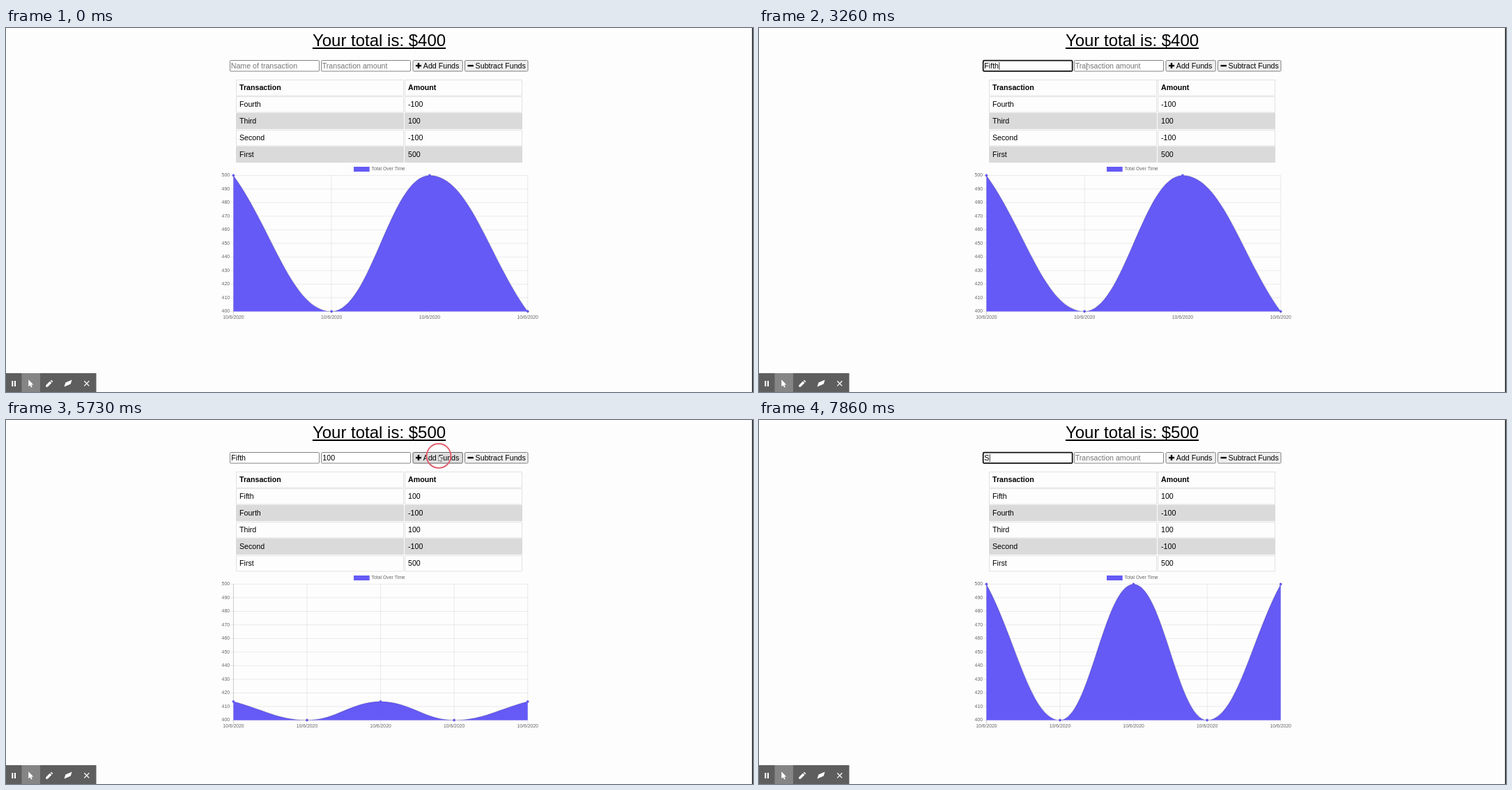
Recreate the animation shown at these times as an HTML page with a canvas. Size 1072 by 522 pixels, loop 8 s.

```html
<!DOCTYPE html>
<html lang="en">
<head>
<meta charset="utf-8">
<title>Budget tracker</title>
<style>
  html, body { margin: 0; width: 100%; height: 100%; overflow: hidden; background: #fdfdfd; }
  canvas { position: absolute; left: 0; top: 0; }
  h1 {
    position: absolute; left: 0; top: 4px; width: 1071px; margin: 0; text-align: center;
    font: 24px/27px "Liberation Sans", Arial, sans-serif; text-decoration: underline; color: #000;
  }
</style>
</head>
<body>
<canvas id="stage" width="1072" height="522"></canvas>
<h1 id="total"></h1>
<script>
const ctx = document.getElementById('stage').getContext('2d');
const total = document.getElementById('total');
const LOOP = 8000, PURPLE = '#655af6';
const ADDED = 5695, CLEARED = 6060;
const FONT = '"Liberation Sans", Arial, sans-serif';

// Form states: time, name value, amount value, focused field
const FORM = [
  [0, '', '', ''], [110, '', '', 'name'],
  [1390, 'F', '', 'name'], [1590, 'Fi', '', 'name'], [1720, 'Fif', '', 'name'],
  [1920, 'Fift', '', 'name'], [2080, 'Fifth', '', 'name'],
  [3580, 'Fifth', '', 'amount'], [4390, 'Fifth', '1', 'amount'],
  [4650, 'Fifth', '10', 'amount'], [4820, 'Fifth', '100', 'amount'],
  [5590, 'Fifth', '100', ''], [CLEARED, '', '', ''],
  [6690, '', '', 'name'], [7830, 'S', '', 'name']
];
// Pointer path: time, x, y
const PATH = [
  [0, 390, 54], [3060, 390, 54], [3360, 510, 56], [5230, 510, 56],
  [5450, 620.7, 51], [6080, 620.7, 51], [6330, 460.5, 63.5], [6500, 390, 55], [LOOP, 390, 55]
];
const POINTER_SHOWN = [[60, 1390], [3060, 4390], [5230, 7830]];
const CLICKS = [[110, 390], [3590, 3860], [5590, 5800], [6690, 6960]];
const ROWS = [['Fifth', '100'], ['Fourth', '-100'], ['Third', '100'], ['Second', '-100'], ['First', '500']];

const within = (t, spans) => spans.some(([from, to]) => t >= from && t < to);

function text(str, x, y, { size = 10.67, color = '#000', bold = false, align = 'left', base = 'alphabetic' } = {}) {
  ctx.font = `${bold ? 'bold ' : ''}${size}px ${FONT}`;
  ctx.fillStyle = color;
  ctx.textAlign = align;
  ctx.textBaseline = base;
  ctx.fillText(str, x, y);
}

function box(x, y, w, h, fill, stroke, radius = 0, lineWidth = 1) {
  ctx.beginPath();
  ctx.roundRect(x, y, w, h, radius);
  if (fill) { ctx.fillStyle = fill; ctx.fill(); }
  if (stroke) { ctx.strokeStyle = stroke; ctx.lineWidth = lineWidth; ctx.stroke(); }
}

function line(x1, y1, x2, y2, color, width) {
  ctx.beginPath();
  ctx.moveTo(x1, y1);
  ctx.lineTo(x2, y2);
  ctx.strokeStyle = color;
  ctx.lineWidth = width;
  ctx.stroke();
}

function polygon(points, fill, stroke) {
  ctx.beginPath();
  points.forEach(([x, y]) => ctx.lineTo(x, y));
  ctx.closePath();
  if (fill) { ctx.fillStyle = fill; ctx.fill(); }
  if (stroke) { ctx.strokeStyle = stroke; ctx.lineWidth = 0.8; ctx.stroke(); }
}

const arrow = (x, y, k) =>
  [[0, 0], [0, 9], [2.1, 7.2], [3.6, 10.2], [5, 9.5], [3.6, 6.7], [6.3, 6.5]].map(([px, py]) => [x + px * k, y + py * k]);

function field(x, value, placeholder, focused, caretOn) {
  if (focused) box(x + 0.7, 46.7, 128, 15.2, '#fff', '#101010', 1.5, 1.8);
  else box(x + 0.5, 46.5, 128, 15.5, '#fff', '#858585', 1);
  if (value) text(value, x + 2.3, 58);
  else text(placeholder, x + 1.7, 58, { color: '#757575' });
  if (focused && caretOn) {
    ctx.font = `10.67px ${FONT}`;
    ctx.fillStyle = '#222';
    ctx.fillRect(x + 2.7 + ctx.measureText(value).width, 49, 0.9, 11);
  }
}

function spinner() {
  box(571, 48, 7, 12.5, '#efefef');
  polygon([[572.4, 52.6], [576, 52.6], [574.2, 50.2]], '#555');
  polygon([[572.4, 56], [576, 56], [574.2, 58.4]], '#555');
}

function drawForm(t) {
  const [since, name, amount, focus] = FORM.filter(s => s[0] <= t).pop();
  const caretOn = (t - since) % 1000 < 500;
  field(321, name, 'Name of transaction', focus === 'name', caretOn);
  field(452, amount, 'Transaction amount', focus === 'amount', caretOn);
  if (focus === 'amount') spinner();

  const pressed = t >= 5590 && t < 5700, hover = t >= 5430 && t < 6120;
  box(584, 46.5, 71.3, 15.5, pressed ? '#f5f5f5' : hover ? '#dedede' : '#efefef',
    pressed ? '#8d8d8d' : hover ? '#606060' : '#808080', 1.5);
  ctx.fillStyle = '#000';
  ctx.fillRect(588, 52.9, 8, 2.4);
  ctx.fillRect(590.8, 50, 2.4, 8);
  text('Add Funds', 598.8, 58);
  box(658.5, 46.5, 90.5, 15.5, '#efefef', '#808080', 1.5);
  ctx.fillStyle = '#000';
  ctx.fillRect(662.5, 52.9, 8.4, 2.4);
  text('Subtract Funds', 673.6, 58);
}

function drawTable(rows) {
  [['Transaction', 'Amount'], ...rows].forEach((cells, i) => {
    const y = 74 + i * 24, shaded = i > 0 && i % 2 === 0;
    [[330, 241], [572, 169]].forEach(([x, w], column) => {
      if (shaded) box(x, y - 0.2, w, 23.2, '#dadada');
      else box(x + 0.5, y + 0.5, w - 1, 22.5, null, '#e2e2e2');
      text(cells[column], x + 5, y + 15, { bold: i === 0 });
    });
  });
}

function drawChart(count, grow, dy) {
  const left = 326.4, right = 748.7, top = 211.4 + dy, bottom = 406.4 + dy;
  const step = (right - left) / (count - 1), label = { size: 6.85, color: '#666', base: 'middle' };
  box(499, 199 + dy, 22.7, 7, PURPLE);
  text('Total Over Time', 524.6, 202.4 + dy, label);

  for (let i = 0; i <= 10; i++) {
    const y = top + i * (bottom - top) / 10;
    line(left - 5, y, right, y, 'rgba(0,0,0,.1)', 0.8);
    text(500 - i * 10, left - 5.4, y, { ...label, align: 'right' });
  }
  const points = [];
  for (let i = 0; i < count; i++) {
    const x = left + i * step;
    line(x, top, x, bottom + 5, i ? 'rgba(0,0,0,.1)' : 'rgba(0,0,0,.25)', 0.8);
    text('10/6/2020', x, 415.5 + dy, { ...label, align: 'center' });
    points.push([x, i % 2 ? bottom : bottom - (bottom - top) * grow]);
  }

  // Tangents are flat at inner points and follow the chord at both ends.
  const tension = 0.4, pull = step * tension;
  const curve = new Path2D();
  curve.moveTo(...points[0]);
  for (let i = 1; i < count; i++) {
    const [x0, y0] = points[i - 1], [x1, y1] = points[i];
    const lift = (y1 - y0) * tension;
    curve.bezierCurveTo(x0 + pull, i === 1 ? y0 + lift : y0,
      x1 - pull, i === count - 1 ? y1 - lift : y1, x1, y1);
  }
  const area = new Path2D(curve);
  area.lineTo(right, bottom);
  area.lineTo(left, bottom);
  ctx.fillStyle = PURPLE;
  ctx.fill(area);
  ctx.strokeStyle = 'rgba(0,0,0,.1)';
  ctx.lineWidth = 1.7;
  ctx.stroke(curve);
  points.forEach(([x, y]) => {
    ctx.beginPath();
    ctx.arc(x, y, 1.8, 0, 2 * Math.PI);
    ctx.fillStyle = PURPLE;
    ctx.fill();
    ctx.lineWidth = 0.6;
    ctx.stroke();
  });
}

function drawToolbar() {
  box(0, 495, 129.5, 27, '#5e5e5e');
  box(22.5, 495, 26.5, 27, '#858585');
  ctx.fillStyle = '#fff';
  ctx.fillRect(8.3, 506, 2, 8);
  ctx.fillRect(12, 506, 2, 8);
  polygon(arrow(32.3, 504.3, 1.1), '#fff');
  polygon([[57.3, 514.8], [57.3, 512.3], [63, 506.6], [65.4, 509], [59.7, 514.8]], '#fff');
  polygon([[63.8, 505.8], [65, 504.7], [67.4, 507.1], [66.2, 508.2]], '#fff');
  polygon([[83.5, 514.5], [85.4, 508.6], [94.6, 504.6], [92.8, 510.4]], '#fff');
  line(112.3, 506.2, 119.3, 513.4, '#fff', 1.3);
  line(119.3, 506.2, 112.3, 513.4, '#fff', 1.3);
}

function drawPointer(t) {
  const next = PATH.findIndex(p => p[0] > t);
  const [t0, x0, y0] = PATH[next - 1], [t1, x1, y1] = PATH[next];
  const k = (t - t0) / (t1 - t0), x = x0 + (x1 - x0) * k, y = y0 + (y1 - y0) * k;
  if (within(t, POINTER_SHOWN)) {
    if (x < 580 && y < 62) {
      line(x, y - 4, x, y + 4, '#777', 0.8);
      line(x - 1.5, y - 4.4, x + 1.5, y - 4.4, '#777', 0.8);
      line(x - 1.5, y + 4.4, x + 1.5, y + 4.4, '#777', 0.8);
    } else polygon(arrow(x, y, 0.9), '#f8f8f8', '#777');
  }
  if (within(t, CLICKS)) {
    ctx.beginPath();
    ctx.arc(x + 0.3, y + 0.4, 17.4, 0, 2 * Math.PI);
    ctx.strokeStyle = '#e3616f';
    ctx.lineWidth = 2;
    ctx.stroke();
  }
}

function draw(t) {
  const added = t >= ADDED;
  const progress = Math.min(1, Math.max(0, (t - ADDED) / 1000));
  const rows = added ? ROWS : ROWS.slice(1);
  const title = `Your total is: $${added ? 500 : 400}`;
  if (total.textContent !== title) total.textContent = title;

  ctx.fillStyle = '#fdfdfd';
  ctx.fillRect(0, 0, 1072, 522);
  drawForm(t);
  drawTable(rows);
  drawChart(rows.length, added ? 1 - (1 - progress) ** 4 : 1, added ? 24 : 0);
  drawToolbar();
  drawPointer(t);
  ctx.fillStyle = '#111';
  ctx.fillRect(1070.7, 0, 1.3, 522);
}

const start = performance.now();
function tick() {
  draw((performance.now() - start) % LOOP);
  requestAnimationFrame(tick);
}
tick();
</script>
</body>
</html>
```
